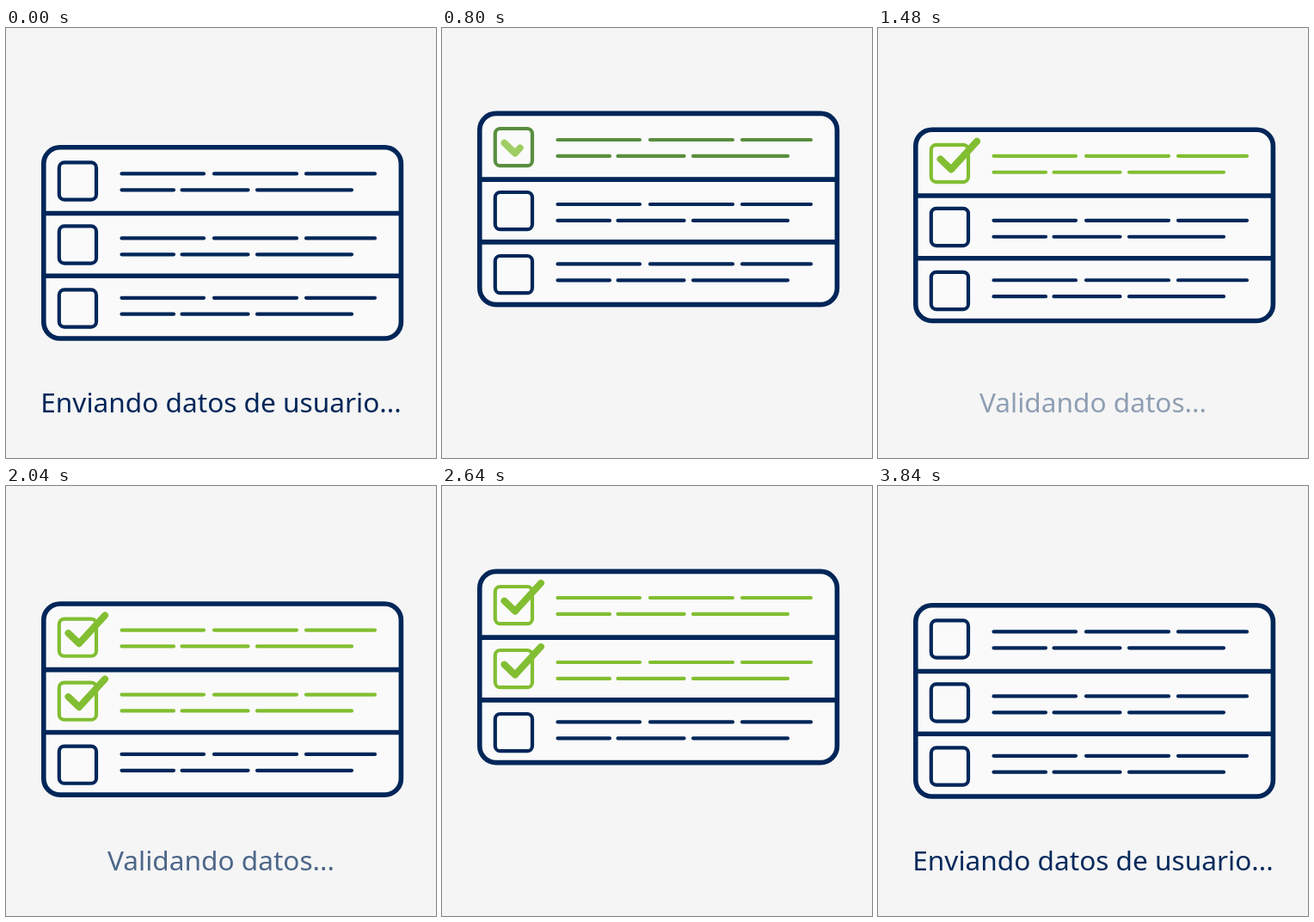
An HTML page for the animation above (3.88 s loop, 500 px wide and 500 px high).

```html
<!DOCTYPE html>
<html lang="es">
<head>
<meta charset="utf-8">
<style>
  html, body { margin: 0; width: 100%; height: 100%; overflow: hidden; background: #f5f5f5; }
  svg { display: block; width: 500px; height: 500px; }
  text { font: 500 31.6px "Noto Sans", sans-serif; fill: #002659; text-anchor: middle; }
  #card { fill: none; stroke: #002659; stroke-linecap: round; stroke-linejoin: round; }
</style>
</head>
<body>
<svg viewBox="0 0 500 500">
  <g id="card">
    <rect x="43.8" y="138.8" width="415.6" height="222.2" rx="19" fill="#fafafa" stroke-width="5.6"/>
    <path d="M44 215.5H459M44 288.3H459" stroke-width="5.6"/>
  </g>
  <text id="sending" x="250" y="447">Enviando datos de usuario...</text>
  <text id="validating" x="250" y="447">Validando datos...</text>
</svg>
<script>
const LOOP = 3880, BOB = 1840, BOB_START = 80, LIFT = 44.3;
const NAVY = [0, 38, 89], GREEN = [130, 190, 50];
const $ = id => document.getElementById(id);
const card = $('card');

// Eased 0..1 progress between two times
const ease = (t, from, to) => {
  const p = Math.min(1, Math.max(0, (t - from) / (to - from)));
  return (1 - Math.cos(Math.PI * p)) / 2;
};
const mix = k => `rgb(${NAVY.map((c, i) => Math.round(c + (GREEN[i] - c) * k))})`;

function add(parent, tag, attrs) {
  const el = document.createElementNS('http://www.w3.org/2000/svg', tag);
  for (const name in attrs) el.setAttribute(name, attrs[name]);
  return parent.appendChild(el);
}

const rows = [[0, 0, 640], [74, 75, 1640], [148, 144.4, 2640]].map(([boxY, lineY, start]) => {
  const item = add(card, 'g', { 'stroke-width': 4.2 });
  add(item, 'rect', { x: 61.8, y: 156.4 + boxY, width: 43.2, height: 43.2, rx: 6 });
  add(item, 'path', {
    transform: `translate(0 ${lineY})`,
    d: 'M134.5 169.4H230M242 169.4H338M349 169.4H429M134.5 188.3H195M204.5 188.3H281.5M292 188.3H402'
  });
  const check = add(card, 'path', {
    d: `M72.5 ${173 + boxY}L85 ${185 + boxY}L115 ${152.3 + boxY}`,
    stroke: mix(1), 'stroke-width': 8, pathLength: 1
  });
  return { item, check, start };
});

function render(t) {
  const bob = Math.min(2 * BOB, Math.max(0, t - BOB_START));
  const y = LIFT / 2 * (Math.cos(2 * Math.PI * bob / BOB) - 1);
  card.setAttribute('transform', `translate(0 ${y})`);

  for (const { item, check, start } of rows) {
    item.setAttribute('stroke', mix(ease(t, start, start + 260) - ease(t, 3360, 3720)));
    check.setAttribute('stroke-dasharray', `${ease(t, start, start + 360)} 2`);
    check.setAttribute('opacity', ease(t, start, start + 240) - ease(t, 3160, 3440));
  }

  const sendingIn = t < BOB_START ? ease(t + LOOP, 3080, 3920) : ease(t, 3080, 3920);
  $('sending').setAttribute('opacity', t < 1000 ? (t < BOB_START ? sendingIn : 1 - ease(t, 80, 400)) : sendingIn);
  $('validating').setAttribute('opacity', ease(t, 1160, 1880) - ease(t, 1920, 2240));
}

const origin = performance.now();
function tick() {
  render((performance.now() - origin) % LOOP);
  requestAnimationFrame(tick);
}
render(0);
requestAnimationFrame(tick);
</script>
</body>
</html>
```
